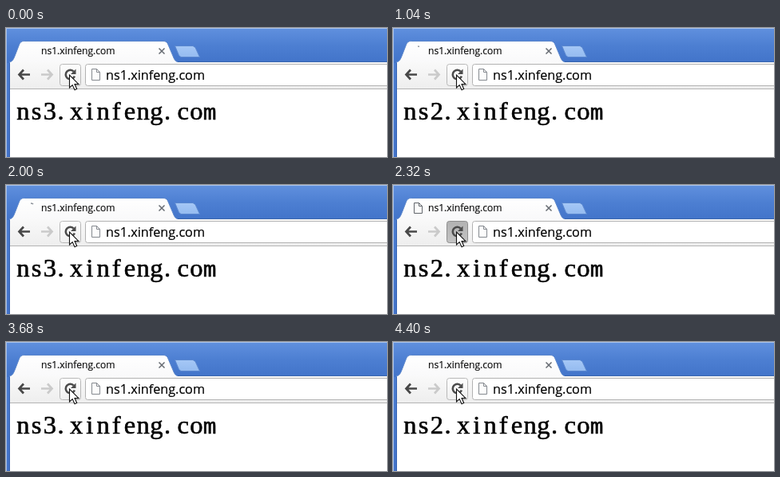
Write an HTML page with a canvas that moves like this. It is 477 px wide and 162 px high and loops after 4720 ms.

```html
<!DOCTYPE html>
<html lang="en">
<head>
<meta charset="utf-8">
<title>Page reload</title>
<style>
  html, body { margin: 0; width: 100%; height: 100%; overflow: hidden; background: #fff; }
  canvas { display: block; }
</style>
</head>
<body>
<canvas id="stage" width="477" height="162"></canvas>
<script>
const ctx = document.getElementById('stage').getContext('2d');
const W = 477, H = 162, LOOP = 4720;

// Each reload goes through five steps: empty tab icon, two spinner steps,
// the new page, then the next press of the button.
const EMPTY = 0, SPIN_A = 1, SPIN_B = 2, LOADED = 3, PRESSED = 4;
const changes = [
  0, 160, 240, 320, 480,
  880, 1040, 1120, 1280, 1360,
  1760, 1920, 2000, 2160, 2320,
  2640, 2880, 2960, 3040, 3200,
  3680, 3920, 4000, 4080, 4240,
  4400
];

function stateAt(ms) {
  let i = changes.length - 1;
  while (changes[i] > ms) i--;
  const step = i % 5;
  const loads = Math.floor(i / 5) + (step >= LOADED ? 1 : 0);
  return { step, server: loads % 2 ? 'ns2' : 'ns3' };
}

function vertical(y0, y1, ...colors) {
  const g = ctx.createLinearGradient(0, y0, 0, y1);
  colors.forEach((c, i) => g.addColorStop(i / (colors.length - 1), c));
  return g;
}

function shape(points, fill, stroke, width = 1) {
  ctx.beginPath();
  points.forEach(([x, y]) => ctx.lineTo(x, y));
  ctx.closePath();
  paint(fill, stroke, width);
}

function paint(fill, stroke, width = 1) {
  if (fill) { ctx.fillStyle = fill; ctx.fill(); }
  if (stroke) { ctx.strokeStyle = stroke; ctx.lineWidth = width; ctx.stroke(); }
}

function box(x, y, w, h, r, fill, stroke) {
  ctx.beginPath();
  ctx.roundRect(x + .5, y + .5, w - 1, h - 1, r);
  paint(fill, stroke);
}

// The thin outline gives the letters the firmness of hinted screen type.
function text(str, x, y, font, color, weight) {
  ctx.font = font;
  ctx.fillStyle = ctx.strokeStyle = color;
  ctx.lineWidth = weight;
  ctx.fillText(str, x, y);
  ctx.strokeText(str, x, y);
}

function drawFrame() {
  ctx.fillStyle = vertical(0, 44, '#6090de', '#4d7fd2', '#4274c9');
  ctx.fillRect(0, 0, W, H);
  ctx.fillStyle = vertical(44, H, '#4a7cd0', '#4272c8');
  ctx.fillRect(0, 44, 5, H - 44);
  ctx.fillStyle = '#a9c3ec';
  ctx.fillRect(0, 0, W, 1);
  ctx.fillRect(0, 0, 1, H);
  ctx.fillStyle = '#3562b2';
  ctx.fillRect(4, 44, 1, H - 44);
}

function drawTabs() {
  shape([[211.5, 22.5], [234, 22.5], [237, 24.5], [242.5, 36.5], [219, 36.5], [216.5, 34.5]],
    vertical(22, 37, '#a6c8f6', '#94bbf0'), '#5a87cf');

  ctx.beginPath();
  ctx.moveTo(4, 43);
  ctx.bezierCurveTo(8.5, 42, 9.5, 39, 11.5, 34);
  ctx.lineTo(16.5, 21);
  ctx.quadraticCurveTo(18, 16.5, 22.5, 16.5);
  ctx.lineTo(197, 16.5);
  ctx.quadraticCurveTo(201.5, 16.5, 203, 21);
  ctx.lineTo(208.5, 34);
  ctx.bezierCurveTo(210.5, 39, 211.5, 42, 216, 43);
  paint(vertical(16, 43, '#ffffff', '#f9f9fa'), '#5b86cb');

  text('ns1.xinfeng.com', 44, 33, '12.1px "Open Sans", sans-serif', '#111', .2);

  ctx.beginPath();
  ctx.moveTo(191.5, 25.5); ctx.lineTo(198.5, 32.5);
  ctx.moveTo(198.5, 25.5); ctx.lineTo(191.5, 32.5);
  paint(null, '#666b72', 1.5);
}

function drawToolbar() {
  ctx.fillStyle = vertical(43, 76, '#f9f9f9', '#eeeeee');
  ctx.fillRect(5, 43, W - 5, 33);
  ctx.fillStyle = '#3a66ae';
  ctx.fillRect(215, 42, W - 215, 1);
  ctx.fillStyle = '#b4b4b4';
  ctx.fillRect(5, 76, W - 5, 1);
  ctx.fillStyle = '#fff';
  ctx.fillRect(5, 77, W - 5, H - 77);

  drawArrow(15, 1, '#484848');
  drawArrow(59, -1, '#cacaca');
  box(99, 45, W, 28, 3, '#fff', '#b2b2b2');
  drawPageIcon(107, 51, 11, 15, '#85898f');
  text('ns1.xinfeng.com', 125, 65, '16.2px "Open Sans", sans-serif', '#000', .2);
}

function drawArrow(x, dir, color) {
  ctx.beginPath();
  ctx.moveTo(x + dir * 7, 52.5);
  ctx.lineTo(x + dir * 1.5, 58.5);
  ctx.lineTo(x + dir * 7, 64.5);
  ctx.moveTo(x + dir * 2, 58.5);
  ctx.lineTo(x + dir * 15, 58.5);
  paint(null, color, 2.7);
}

function drawPageIcon(x, y, w, h, color) {
  const l = x + .5, t = y + .5, r = x + w - .5, b = y + h - .5, fold = 4;
  shape([[l, t], [r - fold, t], [r, t + fold], [r, b], [l, b]], '#fcfcfc', color);
  ctx.beginPath();
  ctx.moveTo(r - fold, t);
  ctx.lineTo(r - fold, t + fold);
  ctx.lineTo(r, t + fold);
  paint(null, color);
}

function drawTabIcon(step) {
  if (step >= LOADED) return drawPageIcon(26, 22, 11, 14, '#62666c');
  if (step === EMPTY) return;
  ctx.beginPath();
  ctx.arc(31, 29, 6, -Math.PI / 2, step === SPIN_A ? -1.22 : -1.02);
  paint(null, '#8d939b', 1.5);
}

function drawReload(pressed) {
  const fill = pressed
    ? vertical(45, 73, '#b2b2b2', '#c3c3c3')
    : vertical(45, 73, '#fdfdfd', '#efefef');
  box(67, 45, 27, 28, 3, fill, pressed ? '#8e8e8e' : '#b8b8b8');
  ctx.beginPath();
  ctx.arc(80.5, 58.5, 5.7, .35, Math.PI * 1.76);
  paint(null, '#4b4b4b', 2.5);
  shape([[87.5, 51.5], [87.5, 58], [81, 58]], '#4b4b4b');
}

function drawCursor() {
  shape([[79.5, 59], [79.5, 75], [83.2, 71.6], [86, 77.7], [88.7, 76.5], [86, 70.6], [91, 70.6]],
    '#fff', '#111', 1.1);
}

// Letters sit in equal cells, like a fixed-width serif face.
function drawPage(server) {
  const cell = 16.7;
  ctx.textAlign = 'center';
  [...server + '.xinfeng.com'].forEach((ch, i) => {
    const font = ch === 'm' ? '27.8px "Liberation Mono", monospace' : '32.5px "Liberation Serif", serif';
    text(ch, 13 + (i + .5) * cell - (ch === '.' ? 3 : 0), 114.5, font, '#000', .6);
  });
  ctx.textAlign = 'left';
}

function draw(now) {
  const { step, server } = stateAt(now % LOOP);
  drawFrame();
  drawTabs();
  drawToolbar();
  drawTabIcon(step);
  drawReload(step === PRESSED);
  drawPage(server);
  drawCursor();
}

const start = performance.now();
function tick() {
  draw(performance.now() - start);
  requestAnimationFrame(tick);
}
tick();
</script>
</body>
</html>
```
